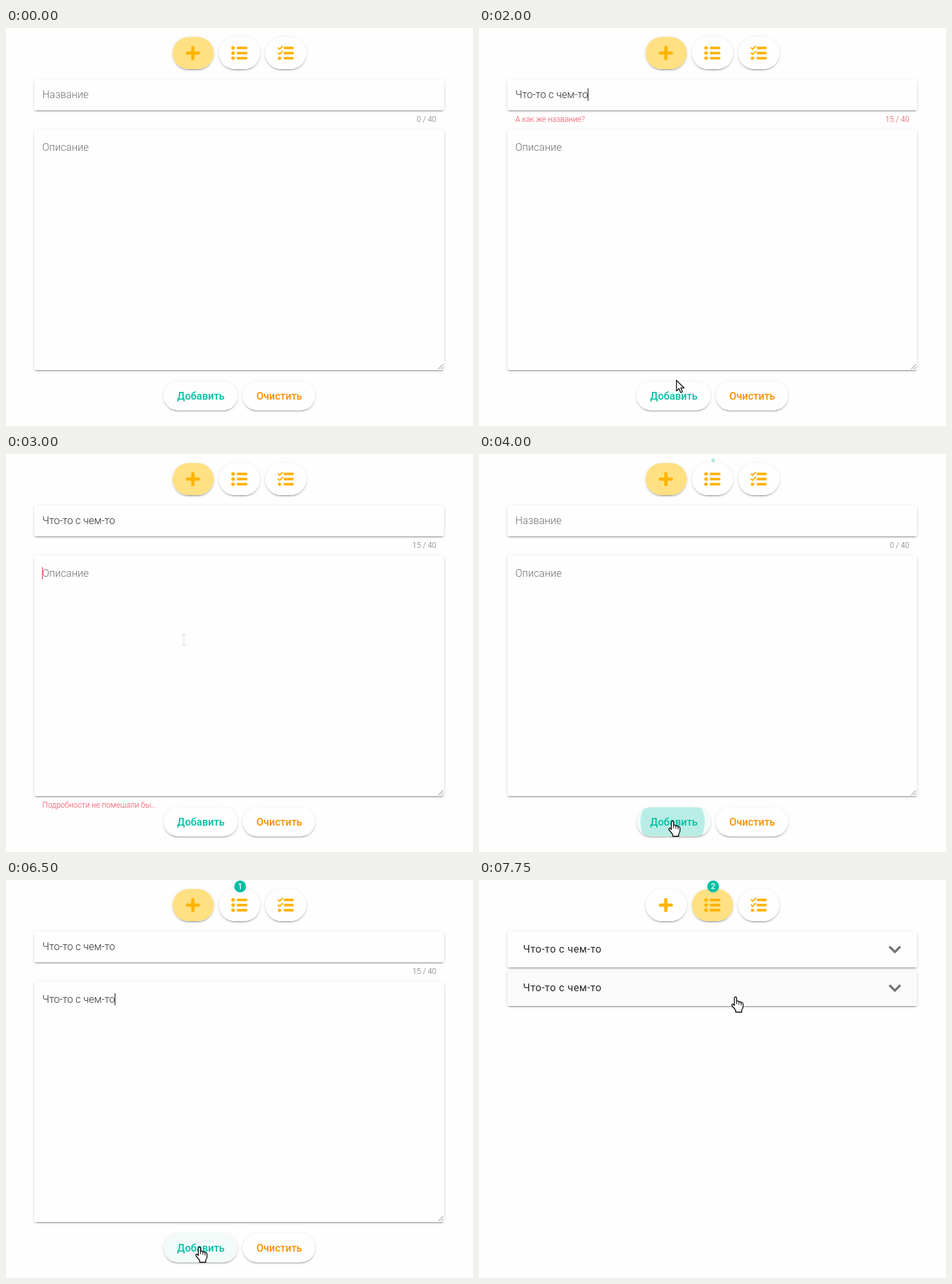
An HTML page with a canvas that plays this animation: 726x619 px, repeating every 8000 ms.

```html
<!DOCTYPE html>
<html lang="ru">
<head>
<meta charset="utf-8">
<title>Заметки</title>
<style>
  html, body { margin: 0; width: 100%; height: 100%; overflow: hidden; background: #fefefe; }
  canvas { display: block; }
</style>
</head>
<body>
<canvas id="stage" width="726" height="619"></canvas>
<script>
const ctx = document.getElementById('stage').getContext('2d');
const LOOP = 8000, TICK = 250;
const PAPER = '#fefefe', AMBER = '#ffb300', AMBER_SOFT = '#ffe082', TEAL = '#00bfa5';
const ORANGE = '#ff8f00', RED = '#ee4454', GREY = '#707070', INK = '#2b2b2b';
const NOTE = 'Что-то с чем-то';
const ADD = { x: 245, y: 549.5, w: 115, h: 45 };
const CLEAR = { x: 368, y: 549.5, w: 112.5, h: 45 };
const TABS = [259, 331, 403].map(x => ({ x, y: 14, w: 64, h: 50 }));

const START = {
  title: 0, desc: 0, focus: '', titleError: false, descError: false,
  hover: '', ripple: 0, badge: 0, badgeScale: 1, list: false, pointer: null
};

// Each step changes only the listed parts of the state.
const STEPS = [
  [250, { pointer: ['hand', 303, 585], hover: 'add' }],
  [500, { pointer: ['hand', 302, 573] }],
  [750, { ripple: 50, titleError: true, focus: 'title' }],
  [1000, { pointer: ['arrow', 314, 540], hover: '', ripple: 0 }],
  [1250, { pointer: ['beam', 316, 495], title: 5 }],
  [1500, { title: 10 }],
  [1750, { title: 15 }],
  [2000, { pointer: ['arrow', 307, 548] }],
  [2250, { pointer: ['hand', 302, 572], hover: 'add' }],
  [2500, { ripple: 50, titleError: false, descError: true, focus: 'desc' }],
  [2750, { pointer: ['beam', 286, 420], hover: '', ripple: 0 }],
  [3000, { pointer: ['beam', 276, 289] }],
  [3250, { desc: 8 }],
  [3500, { desc: 15, pointer: ['beam', 292, 440] }],
  [3750, { pointer: ['hand', 301, 571], hover: 'add' }],
  [4000, { ripple: 50, title: 0, desc: 0, descError: false, focus: '', badge: 1, badgeScale: 0.33 }],
  [4250, { pointer: ['beam', 296, 400], hover: '', ripple: 0, badgeScale: 1 }],
  [4500, { pointer: ['beam', 280, 108] }],
  [4750, { focus: 'title' }],
  [5000, { title: 8 }],
  [5250, { title: 15, pointer: ['beam', 277, 264] }],
  [5500, { focus: 'desc' }],
  [5750, { desc: 8 }],
  [6000, { desc: 15, pointer: ['beam', 290, 420] }],
  [6250, { pointer: ['arrow', 307, 548] }],
  [6500, { pointer: ['hand', 301, 571], hover: 'add' }],
  [6750, { ripple: 50, title: 0, desc: 0, focus: '', badge: 2 }],
  [7000, { pointer: ['beam', 338, 300], hover: '', ripple: 0 }],
  [7250, { pointer: ['hand', 363, 38], hover: 'list', ripple: 20 }],
  [7500, { pointer: ['hand', 370, 66], hover: '', ripple: 0, list: true }],
  [7750, { pointer: ['hand', 399, 182], hover: 'card' }]
];

function stateAt(time) {
  const state = { ...START };
  for (const [start, change] of STEPS) if (start <= time) Object.assign(state, change);
  return state;
}

function roundRect(x, y, w, h, r) {
  ctx.beginPath();
  ctx.roundRect(x, y, w, h, r);
}

function raised({ x, y, w, h }, r, fill = PAPER) {
  const layers = [[3, 1, 2, 0.2], [2, 2, 0, 0.14], [1, 5, 0, 0.12]];
  for (const [drop, blur, inset, alpha] of layers) {
    ctx.save();
    ctx.shadowColor = `rgba(0,0,0,${alpha})`;
    ctx.shadowOffsetY = drop;
    ctx.shadowBlur = blur;
    ctx.fillStyle = PAPER;
    roundRect(x + inset, y + inset, w - 2 * inset, h - 2 * inset, Math.max(r - inset, 2));
    ctx.fill();
    ctx.restore();
  }
  ctx.fillStyle = fill;
  roundRect(x, y, w, h, r);
  ctx.fill();
}

function text(str, x, y, { size = 16, weight = 300, color = GREY, align = 'left', spacing = 0 } = {}) {
  ctx.font = `${weight} ${size}px Roboto, sans-serif`;
  ctx.letterSpacing = spacing + 'px';
  ctx.textAlign = align;
  ctx.fillStyle = color;
  ctx.fillText(str, x, y);
  return ctx.measureText(str).width;
}

function disc(x, y, r, fill) {
  ctx.fillStyle = fill;
  ctx.beginPath();
  ctx.arc(x, y, r, 0, Math.PI * 2);
  ctx.fill();
}

function line(points, width, color, cap = 'round') {
  ctx.beginPath();
  points.forEach(([x, y]) => ctx.lineTo(x, y));
  ctx.lineWidth = width;
  ctx.strokeStyle = color;
  ctx.lineCap = cap;
  ctx.lineJoin = cap === 'round' ? 'round' : 'miter';
  ctx.stroke();
}

function ripple(box, r, x, y, radius, color) {
  ctx.save();
  roundRect(box.x, box.y, box.w, box.h, r);
  ctx.clip();
  disc(x, y, radius, color);
  ctx.restore();
}

function drawTabs(s) {
  const active = s.list ? 1 : 0;
  TABS.forEach((tab, i) => {
    const hovered = i === 1 && s.hover === 'list';
    raised(tab, 25, i === active ? AMBER_SOFT : hovered ? '#fff5dc' : PAPER);
    if (hovered) ripple(tab, 25, 359, 39, s.ripple, '#ffe8ab');
  });
  line([[282, 39], [299, 39]], 5, AMBER);
  line([[290.5, 30.5], [290.5, 47.5]], 5, AMBER);
  for (const y of [31, 39, 47]) {
    disc(353, y, 2.8, AMBER);
    line([[360.5, y], [373.5, y]], 4, AMBER);
    line([[433.5, y], [445.5, y]], 4, AMBER);
    if (y < 47) line([[423.2, y], [425.4, y + 2], [429.8, y - 2.5]], 2.2, AMBER);
  }
  disc(425.2, 47, 2.6, AMBER);
}

function drawBadge(s) {
  if (!s.badge) return;
  const growing = s.badgeScale < 1;
  disc(364, 10, 9.2 * s.badgeScale, growing ? '#b5e9e2' : TEAL);
  if (!growing) text(s.badge, 364, 14.3, { size: 12, weight: 500, color: '#fff', align: 'center' });
}

function field(length, label, baseline, focused, error) {
  const width = length
    ? text(NOTE.slice(0, length), 56.5, baseline, { color: INK })
    : (text(label, 56.5, baseline), 0);
  if (focused) {
    ctx.fillStyle = error && !length ? '#dc3545' : '#111';
    ctx.fillRect(Math.round(56 + width), baseline - 15, 1, 19);
  }
}

function drawForm(s) {
  raised({ x: 44, y: 80, w: 637, h: 48 }, 4);
  raised({ x: 44, y: 158, w: 637, h: 374 }, 4);
  field(s.title, 'Название', 109, s.focus === 'title', s.titleError);
  field(s.desc, 'Описание', 191, s.focus === 'desc', s.descError);

  const small = { size: 12, color: s.titleError ? RED : GREY };
  if (s.titleError) text('А как же название?', 56.5, 146, small);
  else if (s.focus === 'title') text('Не более 40 символов', 56.5, 146, small);
  text(`${s.title} / 40`, 669, 146, { ...small, align: 'right' });
  if (s.descError) text('Подробности не помешали бы...', 56.5, 550, { size: 12, color: RED });

  line([[672, 530.5], [679.5, 523]], 1, '#777', 'butt');
  line([[676.5, 530.5], [679.5, 527.5]], 1, '#777', 'butt');

  raised(ADD, 22.5, s.hover === 'add' ? '#f3fbfa' : PAPER);
  if (s.hover === 'add' && s.ripple) ripple(ADD, 22.5, 301, 572, s.ripple, '#b8ede5');
  raised(CLEAR, 22.5);
  text('Добавить', 303, 578, { weight: 500, color: TEAL, align: 'center' });
  text('Очистить', 424.8, 578, { weight: 500, color: ORANGE, align: 'center' });
}

function drawList(s) {
  [80, 140].forEach((y, i) => {
    raised({ x: 44, y, w: 637, h: 56 }, 4, i && s.hover === 'card' ? '#fafafa' : PAPER);
    text(NOTE, 68.5, y + 33, { weight: 400, color: INK, spacing: 0.5 });
    line([[638, y + 23.5], [646.5, y + 32], [655, y + 23.5]], 3.6, '#757575', 'butt');
  });
}

const SHAPES = {
  arrow: 'M0 0V16.5L3.9 12.8 6.5 19 9.3 17.8 6.7 11.8H11.8Z',
  hand: 'M-2 1.5Q-2 0 -.3 0T1.5 1.5V6.5Q4.5 5.5 5 7.5Q7.8 6.7 8.4 8.6Q11.3 8 11.5 11V15Q11.5 17 9.5 20V23.5H0V20.5L-5.7 13.5Q-6.5 10.5 -4 11L-2 13Z'
};

function drawPointer([kind, x, y]) {
  if (kind === 'beam') {
    const color = '#dcdcdc';
    line([[x + 0.5, y - 8], [x + 0.5, y + 8]], 1, color, 'butt');
    for (const dy of [-8, 8]) line([[x - 3, y + dy], [x + 4, y + dy]], 1, color, 'butt');
    return;
  }
  ctx.save();
  ctx.translate(x, y);
  const shape = new Path2D(SHAPES[kind]);
  ctx.fillStyle = '#fff';
  ctx.fill(shape);
  ctx.lineWidth = 1.3;
  ctx.lineJoin = 'round';
  ctx.strokeStyle = '#000';
  ctx.stroke(shape);
  if (kind === 'hand') {
    for (const [dx, dy] of [[1.5, 6.5], [5, 7.5], [8.4, 8.6]]) line([[dx, dy], [dx, dy + 4]], 1, '#000');
  }
  ctx.restore();
}

function render(now) {
  const s = stateAt(Math.floor(now % LOOP / TICK) * TICK);
  ctx.fillStyle = PAPER;
  ctx.fillRect(0, 0, 726, 619);
  drawTabs(s);
  (s.list ? drawList : drawForm)(s);
  drawBadge(s);
  if (s.pointer) drawPointer(s.pointer);
}

const began = performance.now();
function loop() {
  render(performance.now() - began);
  requestAnimationFrame(loop);
}
loop();
</script>
</body>
</html>
```
